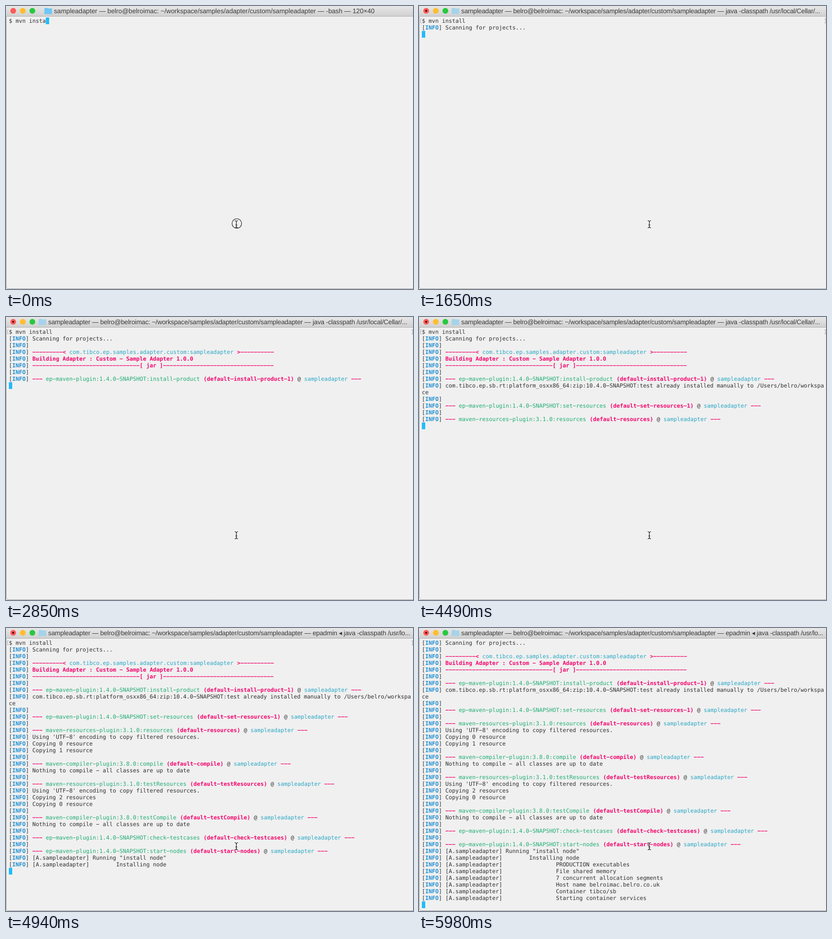
An HTML page with a canvas that plays this animation: 849x590 px, repeating every 8 s.

```html
<!DOCTYPE html>
<html lang="en">
<head>
<meta charset="utf-8">
<title>Terminal</title>
<style>
  html, body { margin: 0; width: 100%; height: 100%; overflow: hidden; background: #f0f0f0; }
  canvas { display: block; }
</style>
</head>
<body>
<canvas width="849" height="590"></canvas>
<script>
const ctx = document.querySelector("canvas").getContext("2d");
const LOOP = 8000, CELL_W = 7, CELL_H = 14, LEFT = 6, TOP = 24;
const MONO = '11.627px "DejaVu Sans Mono", monospace';
const SANS = '13.66px "Liberation Sans", Arial, sans-serif';
const TEXT = "#303030", BLUE = "#1f8ed0", PINK = "#f3056c", CYAN = "#2ba7c4", GREEN = "#20ad75";

// A line is a list of [text, colour] segments.
const info = (...parts) => [["["], ["INFO", BLUE], ["] "], ...parts];
const say = text => info([text]);
const loud = text => info([text, PINK]);
const goal = (plugin, id) => info(["--- ", PINK], [plugin, GREEN],
  [` (default-${id})`, PINK], [" @ "], ["sampleadapter", CYAN], [" ---", PINK]);
const node = (indent, text) => say("[A.sampleadapter]" + " ".repeat(indent) + text);
const dashes = n => "-".repeat(n);

const COMMAND = "$ mvn install";
const EP = "ep-maven-plugin:1.4.0-SNAPSHOT:";
const lines = [
  [[COMMAND]],
  say("Scanning for projects..."),
  info(),
  info([dashes(9) + "< ", PINK], ["com.tibco.ep.samples.adapter.custom:sampleadapter", CYAN], [" >" + dashes(10), PINK]),
  loud("Building Adapter : Custom - Sample Adapter 1.0.0"),
  loud(dashes(32) + "[ jar ]" + dashes(33)),
  info(),
  goal(EP + "install-product", "install-product-1"),
  say("com.tibco.ep.sb.rt:platform_osxx86_64:zip:10.4.0-SNAPSHOT:test already installed manually to /Users/belro/workspa"),
  [["ce"]],
  info(),
  goal(EP + "set-resources", "set-resources-1"),
  info(),
  goal("maven-resources-plugin:3.1.0:resources", "resources"),
  say("Using 'UTF-8' encoding to copy filtered resources."),
  say("Copying 0 resource"),
  say("Copying 1 resource"),
  info(),
  goal("maven-compiler-plugin:3.8.0:compile", "compile"),
  say("Nothing to compile - all classes are up to date"),
  info(),
  goal("maven-resources-plugin:3.1.0:testResources", "testResources"),
  say("Using 'UTF-8' encoding to copy filtered resources."),
  say("Copying 2 resources"),
  say("Copying 0 resource"),
  info(),
  goal("maven-compiler-plugin:3.8.0:testCompile", "testCompile"),
  say("Nothing to compile - all classes are up to date"),
  info(),
  goal(EP + "check-testcases", "check-testcases"),
  info(),
  goal(EP + "start-nodes", "start-nodes"),
  node(1, 'Running "install node"'),
  node(8, "Installing node"),
  node(16, "PRODUCTION executables"),
  node(16, "File shared memory"),
  node(16, "7 concurrent allocation segments"),
  node(16, "Host name belroimac.belro.co.uk"),
  node(16, "Container tibco/sb"),
  node(16, "Starting container services"),
];

const PLACE = "sampleadapter — belro@belroimac: ~/workspace/samples/adapter/custom/sampleadapter — ";
const JAVA = "java -classpath /usr/local/Cellar/...";
const EPADMIN = "epadmin ◂ java -classpath /usr/lo...";

// [start ms, value] pairs
const typed = [[0, 11], [300, 12], [450, 13]];
const printed = [[0, 0], [750, 1], [1650, 2], [2400, 6], [2850, 8], [4490, 14], [4640, 32], [4940, 34], [5690, 39], [5980, 40]];
const process = [[0, "-bash — 120×40"], [900, JAVA], [4940, EPADMIN], [5240, JAVA], [5540, EPADMIN]];
const at = (steps, t) => steps.filter(([start]) => start <= t).pop()[1];

function rect(x, y, w, h, color) {
  ctx.fillStyle = color;
  ctx.fillRect(x, y, w, h);
}

function disc(x, y, r, color) {
  ctx.fillStyle = color;
  ctx.beginPath();
  ctx.arc(x, y, r, 0, 7);
  ctx.fill();
}

function stroke(path, width, color) {
  ctx.lineWidth = width;
  ctx.strokeStyle = color;
  ctx.stroke(path);
}

function drawTitle(t) {
  const busy = t >= 900, x = busy ? 88 : 100;
  const bar = ctx.createLinearGradient(0, 0, 0, 21);
  bar.addColorStop(0, "#e7e7e7");
  bar.addColorStop(1, "#d1d1d1");
  rect(0, 0, 849, 21, bar);
  rect(0, 21, 849, 1, "#b1b1b1");
  ["#fc5b57", "#fdbe2f", "#27c93f"].forEach((color, i) => disc(15 + 20 * i, 10, 6, color));
  if (busy) disc(15, 10, 2, "#4c0000");
  const folder = busy ? "#a6d3ea" : "#6fc8f6";
  rect(x - 19, 4, 6, 2, folder);
  rect(x - 20, 5, 16, 12, folder);
  ctx.font = SANS;
  ctx.letterSpacing = busy ? "-0.19px" : "0px";
  ctx.fillStyle = "#3a3a3a";
  ctx.fillText(PLACE + at(process, t), x, 15);
  ctx.letterSpacing = "0px";
}

function drawLine(parts, row) {
  let col = 0;
  for (const [text, color = TEXT] of parts) {
    ctx.font = (color === BLUE || color === PINK ? "bold " : "") + MONO;
    ctx.fillStyle = color;
    // the wide minus gives the terminal's long dash
    ctx.fillText(text.replace(/-/g, "−"), LEFT + col * CELL_W, TOP + row * CELL_H + 11);
    col += text.length;
  }
}

function drawTerminal(t) {
  const count = at(printed, t), scroll = Math.max(0, count - 39);
  const shown = count ? lines.slice(scroll, count) : [[[COMMAND.slice(0, at(typed, t))]]];
  const col = count ? 0 : at(typed, t);
  rect(LEFT + col * CELL_W, TOP + (count - scroll) * CELL_H, CELL_W, CELL_H, "#1fbcfc");
  shown.forEach(drawLine);
  if (count && !scroll) {
    stroke(new Path2D("M5.5 26.5h-2v9h2M846 26.5h2v9h-2"), 1, "#a5a5a5");
  }
}

const beam = new Path2D("M477 447.5q3.5 0 3.5 3q0-3 3.5-3M480.5 450v10M477 462.5q3.5 0 3.5-3q0 3 3.5 3M478.5 456.5h4");
const ring = new Path2D("M471.5 453.5a10 10 0 1 0 20 0a10 10 0 1 0-20 0");

function drawPointer(t) {
  stroke(beam, 3, "#f4f4f4");
  stroke(beam, 1.2, "#111");
  if (t < 150) stroke(ring, 1.1, "#111");
}

function frame(now) {
  const t = now % LOOP;
  rect(0, 0, 849, 590, "#f0f0f0");
  drawTitle(t);
  drawTerminal(t);
  stroke(new Path2D("M.5 22V584q0 5.5 5.5 5.5H849"), 1, "#a0a0a0");
  drawPointer(t);
  requestAnimationFrame(frame);
}

ctx.textRendering = "geometricPrecision";
requestAnimationFrame(frame);
</script>
</body>
</html>
```
